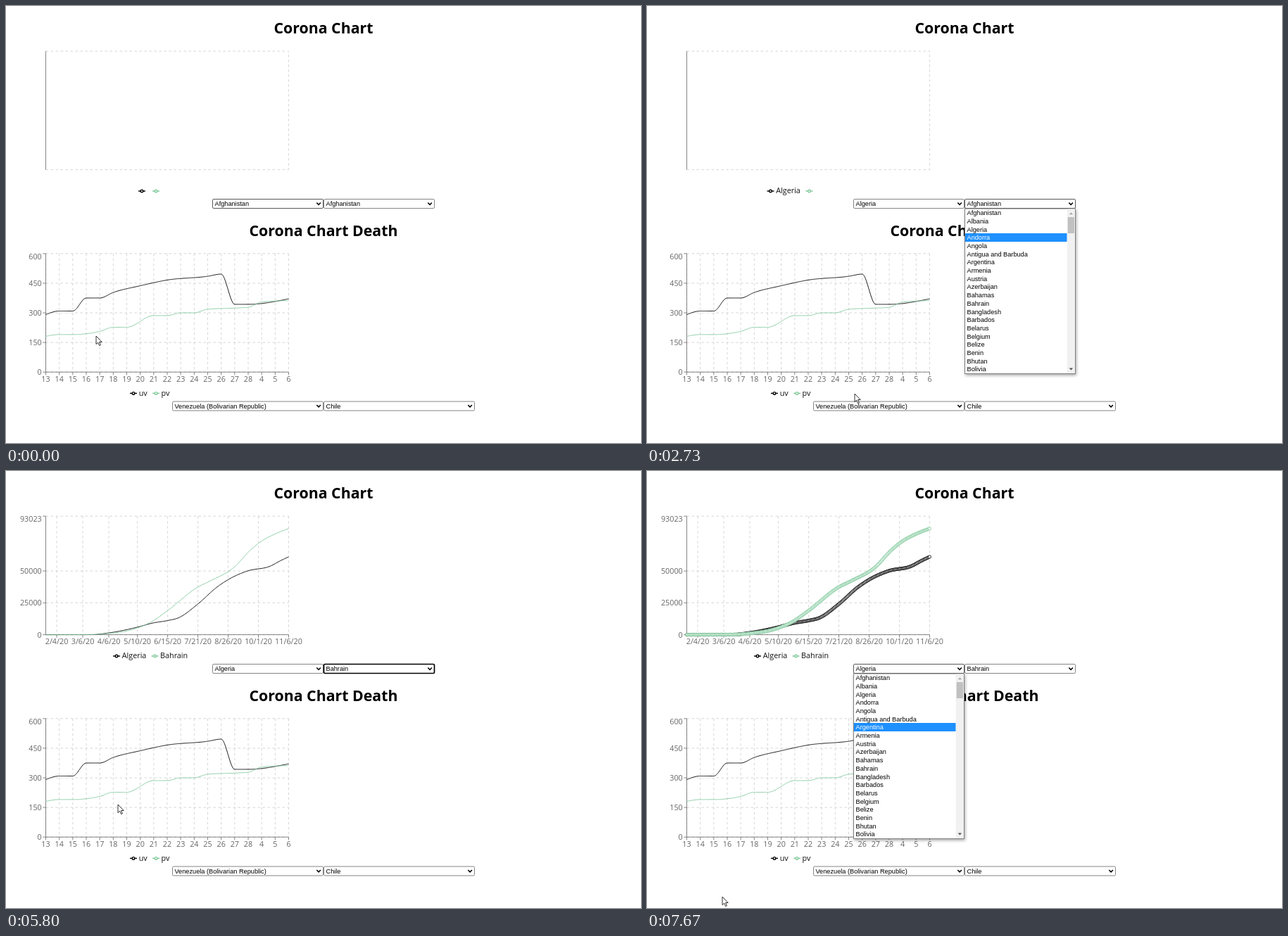
An HTML page that plays this animation: 902x621 px, repeating every 8000 ms.

```html
<!DOCTYPE html>
<html lang="en">
<head>
<meta charset="utf-8">
<title>Corona Chart</title>
<style>
html, body { margin: 0; width: 100%; height: 100%; overflow: hidden; background: #fff; }
svg { display: block; }
text { white-space: pre; }
.title { font: bold 21.3px "Open Sans", "Noto Sans", sans-serif; text-anchor: middle; }
.tick { font: 10.8px "Open Sans", "Noto Sans", sans-serif; fill: #666; }
.legend { font: 10.8px "Open Sans", "Noto Sans", sans-serif; fill: #111; }
.option { font: 9.2px "Liberation Sans", Arial, sans-serif; }
.grid { stroke: #ccc; stroke-width: .8; stroke-dasharray: 3.5 3.5; fill: none; }
.axis { stroke: #666; stroke-width: .8; fill: none; }
.curve { stroke-width: .9; fill: none; }
.dot { stroke-width: .8; fill: #fff; }
.icon { stroke-width: 1.4; fill: #fff; }
.list { fill: #fff; stroke: #767676; stroke-width: .9; filter: drop-shadow(1.5px 2px 2px rgba(0, 0, 0, .35)); }
</style>
</head>
<body>
<svg width="902" height="621" viewBox="0 0 902 621">
  <g id="page"></g>
  <g id="live"></g>
  <path id="cursor" d="M0 0V11.6L2.7 9.2 4.6 13.6 6.4 12.8 4.6 8.5H8.2Z" fill="#fff" stroke="#000" stroke-width=".8"/>
</svg>
<script>
const LOOP = 8000, LEFT = 56.5, RIGHT = 401.5, HEIGHT = 168.4;
const BLACK = '#000', GREEN = '#82ca9d';
const OPTIONS = ['Afghanistan', 'Albania', 'Algeria', 'Andorra', 'Angola', 'Antigua and Barbuda',
  'Argentina', 'Armenia', 'Austria', 'Azerbaijan', 'Bahamas', 'Bahrain', 'Bangladesh', 'Barbados',
  'Belarus', 'Belgium', 'Belize', 'Benin', 'Bhutan', 'Bolivia'];

const text = (cls, x, y, str, attrs = '') => `<text class="${cls}" x="${x}" y="${y}" ${attrs}>${str}</text>`;
const path = (cls, d, attrs = '') => `<path class="${cls}" d="${d}" ${attrs}/>`;
const pairs = list => list.split(' ').map(p => p.split(',').map(Number));

// Monotone cubic interpolation, returned as a function of x
function monotone(pts) {
  const n = pts.length - 1;
  const h = i => pts[i + 1][0] - pts[i][0];
  const s = i => (pts[i + 1][1] - pts[i][1]) / h(i);
  const m = pts.map((_, i) => {
    if (!i || i === n) return 0;
    const a = s(i - 1), b = s(i), p = (a * h(i) + b * h(i - 1)) / (h(i) + h(i - 1));
    return (Math.sign(a) + Math.sign(b)) * Math.min(Math.abs(a), Math.abs(b), Math.abs(p) / 2);
  });
  m[0] = (3 * s(0) - m[1]) / 2;
  m[n] = (3 * s(n - 1) - m[n - 1]) / 2;
  return x => {
    let i = 0;
    while (i < n - 1 && x > pts[i + 1][0]) i++;
    const w = h(i), u = (x - pts[i][0]) / w, v = 1 - u;
    return pts[i][1] * v * v * (1 + 2 * u) + pts[i + 1][1] * u * u * (3 - 2 * u)
      + w * u * v * (m[i] * v - m[i + 1] * u);
  };
}

// A chart area: maps index and value to the stage, draws axes and curves
function makeChart(top, xMax, yMax) {
  const bottom = top + HEIGHT;
  const px = x => LEFT + (RIGHT - LEFT) * x / xMax;
  const py = y => bottom - HEIGHT * y / yMax;
  return {
    axes(values, columns) {
      let grid = '', axis = `M${LEFT} ${top}V${bottom}H${RIGHT}`, labels = '';
      for (const v of values) {
        const y = py(v);
        grid += `M${LEFT} ${y}H${RIGHT}`;
        axis += `M${LEFT - 4.2} ${y}h4.2`;
        labels += text('tick', 50.8, Math.max(y, top + 3.7) + 4, v, 'text-anchor="end"');
      }
      for (const [i, label] of columns) {
        const x = px(i);
        grid += `M${x} ${top}V${bottom}`;
        axis += `M${x} ${bottom}v4.2`;
        labels += text('tick', x, bottom + 13.4, label, 'text-anchor="middle"');
      }
      return path('grid', grid) + path('axis', axis) + labels;
    },
    sample(data, count) {
      const f = monotone(pairs(data));
      return Array.from({ length: count + 1 }, (_, i) => {
        const x = xMax * i / count;
        return [px(x).toFixed(2), py(f(x)).toFixed(2)];
      });
    },
    empty: () => path('grid', `M${LEFT} ${top}H${RIGHT}V${bottom}M${LEFT} ${bottom}H${RIGHT}`) +
      path('axis', `M${LEFT} ${top}V${bottom}`)
  };
}
const curve = (pts, color) => path('curve', 'M' + pts.join('L'), `stroke="${color}"`);
const dots = (pts, color) =>
  pts.map(([x, y]) => `<circle class="dot" cx="${x}" cy="${y}" r="2.1" stroke="${color}"/>`).join('');

const icon = (x, y, color) =>
  `<g class="icon" stroke="${color}"><path d="M${x} ${y}h10"/><circle cx="${x + 5}" cy="${y}" r="1.8"/></g>`;
const legend = (y, x1, name1, x2, name2) =>
  icon(x1, y, BLACK) + text('legend', x1 + 12.7, y + 3.2, name1) +
  icon(x2, y, GREEN) + text('legend', x2 + 12.5, y + 3.2, name2);

function select(x, y, width, label, border = '#767676', weight = .9) {
  return `<rect x="${x}" y="${y}" width="${width}" height="13" rx="1.6" fill="#fff" stroke="${border}" stroke-width="${weight}"/>` +
    text('option', x + 3, y + 9.8, label) +
    path('', `M${x + width - 9.2} ${y + 4.9}l2.8 2.9 2.8-2.9`, 'fill="none" stroke="#000" stroke-width="1.5"');
}

const rowTop = i => Math.round(288.15 + i * 11.7);
function dropdown(x, active) {
  const bar = x + 145.2;
  let out = `<rect class="list" x="${x}" y="288" width="157" height="234.5"/>
    <rect x="${bar}" y="288.5" width="11.3" height="233.5" fill="#f1f1f1"/>
    <rect x="${bar + 1}" y="300" width="9.3" height="23" fill="#c1c1c1"/>` +
    path('', `M${bar + 3} 296.3h5.4l-2.7-2.9z`, 'fill="#a3a3a3"') +
    path('', `M${bar + 3} 514.5h5.4l-2.7 2.9z`, 'fill="#505050"') +
    `<rect x="${x + .5}" y="${rowTop(active)}" width="144.5" height="${rowTop(active + 1) - rowTop(active)}" fill="#1e90ff"/>`;
  OPTIONS.forEach((name, i) => {
    out += text('option', x + 3, rowTop(i) + 8.8, name, i === active ? 'fill="#fff"' : '');
  });
  return out;
}

// Lower chart: days 13 to 28, then 4 to 6
const deaths = makeChart(351.8, 18, 600);
const days = Array.from({ length: 19 }, (_, i) => [i, i < 16 ? 13 + i : i - 12]);
const uv = deaths.sample('0,291 1,309 2,309 3,375 4,375 5,403 7,437 9,466 12,485 13,496 14,343 15,343 18,371', 360);
const pv = deaths.sample('0,181 1,190 2,190 4,206 5,227 6,227 8,286 9,286 10,300 11,300 12,318 15,328 16,355 18,362', 360);

document.getElementById('page').innerHTML =
  text('title', 451, 39.4, 'Corona Chart') + text('title', 451, 327.2, 'Corona Chart Death') +
  deaths.axes([600, 450, 300, 150, 0], days) + curve(uv, BLACK) + curve(pv, GREEN) +
  legend(550.4, 176, 'uv', 208, 'pv') +
  select(236.5, 562, 214, 'Venezuela (Bolivarian Republic)') + select(451.5, 562, 214, 'Chile');

// Upper chart: one dot per day, counted from 22 January 2020
const LAST_DAY = 289;
const cases = makeChart(64.2, LAST_DAY, 93023);
const first = cases.sample('0,0 55,50 75,1400 109,5900 127,9100 145,11100 157,13000 181,24100 204,37500 217,43200 240,50000 267,53800 280,58300 289,61100', LAST_DAY);
const second = cases.sample('0,0 55,100 75,1000 104,4200 127,10600 145,18900 181,37400 196,42300 224,52900 244,66700 253,71700 275,79700 289,83300', LAST_DAY);
const dates = [13, 44, 75, 109, 145, 181, 217, 253, 289].map(d => {
  const date = new Date(2020, 0, 22 + d);
  return [d, `${date.getMonth() + 1}/${date.getDate()}/20`];
});
const fullAxes = cases.axes([93023, 50000, 25000, 0], dates);
const emptyChart = cases.empty();
const plainChart = fullAxes + curve(first, BLACK) + curve(second, GREEN);
const dottedChart = fullAxes + curve(first, BLACK) + dots(first, BLACK) + curve(second, GREEN) + dots(second, GREEN);

// Clicks: each one opens a list or picks from it
const OPEN_1 = 270, PICK_1 = 1470, OPEN_2 = 2130, PICK_2 = 4930, REOPEN_1 = 5930, DOTS = 6470;

// Key points of the pointer: time, x, y (it leaves the stage at the bottom)
const POINTER = pairs('0,128,469 70,125,475 600,125,475 930,100,522 1470,100,522 2130,291,476 2270,291,476 ' +
  '2730,295,551 3530,303,640 4330,303,700 4930,303,700 5130,303,640 5200,300,598 5800,159,474 6070,153,478 ' +
  '6330,147,572 6730,121,619 7000,115,630 7530,107,606 8000,107,604');

function pointerAt(t) {
  const i = POINTER.findIndex(k => k[0] > t);
  const [t0, x0, y0] = POINTER[i - 1], [t1, x1, y1] = POINTER[i], u = (t - t0) / (t1 - t0);
  return [x0 + (x1 - x0) * u, y0 + (y1 - y0) * u].map(Math.round);
}

function scene(t, pointerY) {
  const within = (a, b) => t >= a && t < b;
  const picked1 = t >= PICK_1, picked2 = t >= PICK_2;
  const name1 = picked1 ? 'Algeria' : '', name2 = picked2 ? 'Bahrain' : '';
  const open = within(OPEN_1, PICK_1) || t >= REOPEN_1 ? 1 : within(OPEN_2, PICK_2) ? 2 : 0;
  const focus = within(PICK_1, OPEN_2) ? 1 : within(PICK_2, REOPEN_1) ? 2 : 0;

  // The highlight starts on the chosen option and follows the pointer
  const chosen = open === 1 && picked1 ? OPTIONS.indexOf(name1) : 0;
  const row = Math.max(chosen, Math.floor((pointerY - 482) / 19.5));

  const box = (n, x, label) => select(x, 274.5, 157, label,
    ...(focus === n ? ['#000', 1.7] : open === n || (n === 1 && t < OPEN_1) ? ['#444', .9] : []));
  const chart = t >= DOTS ? dottedChart : picked2 ? plainChart : emptyChart;
  const [x1, x2] = picked2 ? [152, 206.5] : picked1 ? [170.5, 225.5] : [188, 208];
  return chart + legend(263, x1, name1, x2, name2) +
    box(1, 293.5, name1 || OPTIONS[0]) + box(2, 451.5, name2 || OPTIONS[0]) +
    (open ? dropdown(open === 1 ? 293.5 : 451.5, row) : '');
}

const live = document.getElementById('live'), cursor = document.getElementById('cursor');
let start, shown;
function frame(now) {
  start ??= now;
  const t = (now - start) % LOOP, [x, y] = pointerAt(t), html = scene(t, y);
  if (html !== shown) live.innerHTML = shown = html;
  cursor.setAttribute('transform', `translate(${x} ${y})`);
  requestAnimationFrame(frame);
}
requestAnimationFrame(frame);
</script>
</body>
</html>
```
